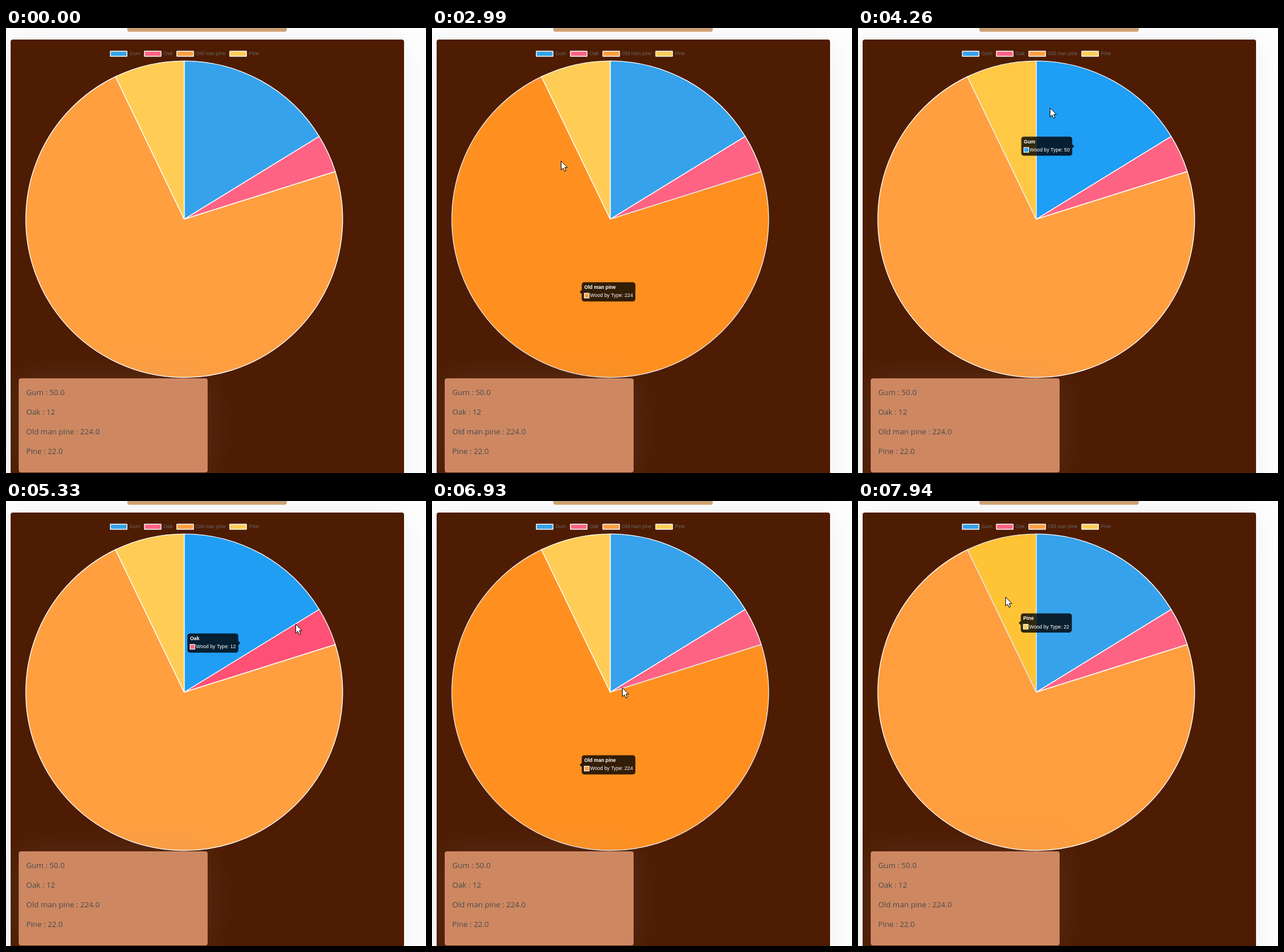
These frames come from a looping animation (727x771 px, 8000 ms). An HTML page with a canvas:

```html
<!DOCTYPE html>
<html lang="en">
<head>
<meta charset="utf-8">
<title>Wood by type</title>
<style>
  html, body { margin: 0; width: 100%; height: 100%; overflow: hidden; background: #fff; }
  canvas { display: block; }
</style>
</head>
<body>
<canvas id="stage" width="727" height="771"></canvas>
<script>
const ctx = document.getElementById('stage').getContext('2d');
const LOOP = 8000, STEP = 1000 / 15, FADE = 400;
const UNIT = 0.72;                       // chart pixels to stage pixels
const CX = 308.5, CY = 331.3, RADIUS = 274.2;
const SMALL = `${12 * UNIT}px "Liberation Sans", sans-serif`;

const slices = [
  { name: 'Gum', value: 50, shown: '50.0', color: [54, 162, 235], hover: [6, 154, 255], side: 'right' },
  { name: 'Oak', value: 12, shown: '12', color: [255, 99, 132], hover: [255, 64, 105], side: 'right' },
  { name: 'Old man pine', value: 224, shown: '224.0', color: [255, 159, 64], hover: [255, 144, 32], side: 'left' },
  { name: 'Pine', value: 22, shown: '22.0', color: [255, 205, 86], hover: [255, 194, 52], side: 'left' },
];

// [time, slice under the pointer]
const hovers = [[1385, 2], [3230, 3], [4202, 0], [5261, 1], [6504, 2], [7115, 3], [7206, 2], [7725, 3]];

// [time, x, y] of the pointer tip; it is hidden between the paths
const paths = [
  [[730, 722, 676], [800, 718, 714]],
  [[1333, 603, 418], [1400, 560, 426], [1600, 420, 450], [1850, 290, 436], [2067, 242, 421],
   [2333, 242, 421], [2667, 234, 350], [3000, 223, 230], [3200, 226, 178], [3267, 240, 162],
   [3600, 262, 140], [3867, 270, 135], [4067, 270, 135], [4133, 285, 134], [4267, 332, 138],
   [4600, 420, 150], [4933, 470, 170], [5267, 499, 207], [5333, 501, 213], [5667, 508, 232],
   [6200, 508, 232], [6533, 499, 284], [6800, 400, 375], [7067, 258, 270], [7133, 248, 200],
   [7200, 233, 215], [7400, 221, 231], [7600, 221, 231], [7667, 228, 215], [7733, 240, 185],
   [7800, 248, 172], [7933, 255, 166], [8000, 257, 164]],
];

const lerp = (a, b, k) => a + (b - a) * k;
const mix = (a, b, k) => a.map((v, i) => lerp(v, b[i], k));
const rgb = c => `rgb(${c.map(Math.round)})`;
const easeOutQuart = p => 1 - (1 - Math.min(1, p)) ** 4;

function text(string, x, y, font, color, baseline = 'middle') {
  ctx.font = font;
  ctx.fillStyle = color;
  ctx.textBaseline = baseline;
  ctx.fillText(string, x, y);
}

function panel(x, y, w, h, r, color) {
  ctx.fillStyle = color;
  ctx.beginPath();
  ctx.roundRect(x, y, w, h, r);
  ctx.fill();
}

function shadowPanel(...box) {
  ctx.save();
  ctx.shadowColor = 'rgba(140, 152, 170, 0.16)';
  ctx.shadowBlur = 60;
  panel(...box);
  ctx.restore();
}

// Angles and tooltip placement follow from the values.
const total = slices.reduce((sum, s) => sum + s.value, 0);
let angle = -Math.PI / 2;
ctx.font = SMALL;
for (const s of slices) {
  s.start = angle;
  s.end = angle += s.value / total * 2 * Math.PI;
  const middle = (s.start + s.end) / 2;
  s.label = `Wood by Type: ${s.value}`;
  s.tipWidth = ctx.measureText(s.label).width + 26 * UNIT;
  const anchor = CX + Math.cos(middle) * RADIUS / 2;
  s.tipX = s.side === 'left' ? anchor + 7 * UNIT : anchor - 7 * UNIT - s.tipWidth;
  s.tipY = CY + Math.sin(middle) * RADIUS / 2;
}

// State vector: highlight of each slice, then tooltip x, y, width and opacity.
function hoverState(t) {
  const targetOf = i => {
    const s = slices[i];
    return [...slices.map((_, k) => +(k === i)), s.tipX, s.tipY, s.tipWidth, 1];
  };
  const first = slices[hovers[0][1]];
  let state = [0, 0, 0, 0, first.tipX, first.tipY, first.tipWidth, 0];
  let active = null;
  hovers.forEach(([time, index], n) => {
    if (t < time) return;
    const until = Math.min(t, hovers[n + 1]?.[0] ?? LOOP);
    state = mix(state, targetOf(index), easeOutQuart((until - time) / FADE));
    active = slices[index];
  });
  return { state, active };
}

function drawLegend() {
  let x = 180.6;
  for (const s of slices) {
    ctx.fillStyle = rgb(s.color);
    ctx.strokeStyle = '#fff';
    ctx.lineWidth = 2 * UNIT;
    ctx.fillRect(x, 40.3, 40 * UNIT, 12 * UNIT);
    ctx.strokeRect(x, 40.3, 40 * UNIT, 12 * UNIT);
    text(s.name, x + 46 * UNIT, 44.4, SMALL, '#666');
    x += 56 * UNIT + ctx.measureText(s.name).width;
  }
}

function drawPie(highlights) {
  ctx.lineWidth = 2 * UNIT;
  ctx.lineJoin = 'bevel';
  slices.forEach((s, i) => {
    ctx.beginPath();
    ctx.arc(CX, CY, RADIUS, s.start, s.end);
    ctx.lineTo(CX, CY);
    ctx.closePath();
    ctx.fillStyle = rgb(mix(s.color, s.hover, highlights[i]));
    ctx.strokeStyle = rgb(mix([255, 255, 255], [230, 230, 230], highlights[i]));
    ctx.fill();
    ctx.stroke();
  });
}

function drawTooltip(slice, [x, y, width, opacity]) {
  const height = 46 * UNIT, top = y - height / 2, pad = 6 * UNIT, box = 12 * UNIT;
  ctx.save();
  ctx.globalAlpha = opacity;
  ctx.fillStyle = 'rgba(0, 0, 0, 0.8)';
  const left = slice.side === 'left';
  const edge = left ? x : x + width, tip = edge + (left ? -5 : 5) * UNIT;
  ctx.beginPath();
  ctx.roundRect(x, top, width, height, 6 * UNIT);
  ctx.moveTo(edge, y - 5 * UNIT);
  if (left) {
    ctx.lineTo(edge, y + 5 * UNIT);
    ctx.lineTo(tip, y);
  } else {
    ctx.lineTo(tip, y);
    ctx.lineTo(edge, y + 5 * UNIT);
  }
  ctx.fill('nonzero');

  const row = top + 32 * UNIT;
  text(slice.name, x + pad, top + 12.5 * UNIT, `bold ${SMALL}`, '#fff');
  ctx.fillStyle = '#fff';
  ctx.fillRect(x + pad - 0.4, row - box / 2 - 0.4, box + 0.8, box + 0.8);
  ctx.fillStyle = rgb(slice.color);
  ctx.fillRect(x + pad + 0.8, row - box / 2 + 0.8, box - 1.6, box - 1.6);
  text(slice.label, x + pad + 14 * UNIT, row + 0.4, SMALL, '#fff');
  ctx.restore();
}

function drawList() {
  shadowPanel(22, 607, 327, 163, 4, '#cd8862');
  slices.forEach((s, i) =>
    text(`${s.name} : ${s.shown}`, 35, 635.5 + i * 34.2, '13.2px "Open Sans", sans-serif', '#4a4a4a', 'alphabetic'));
}

function pointerAt(t) {
  const path = paths.find(p => t >= p[0][0] && t <= p.at(-1)[0] + 30);
  if (!path) return null;
  const next = path.findIndex(p => p[0] > t);
  if (next < 1) return path.at(-1).slice(1);
  const [a, b] = [path[next - 1], path[next]];
  return mix(a, b, (t - a[0]) / (b[0] - a[0])).slice(1);
}

const arrow = new Path2D('M.5 .5V16L4 12.7 6.4 18.2 9 17.1 6.7 11.7H11.3Z');
function drawPointer(x, y) {
  ctx.save();
  ctx.translate(Math.round(x), Math.round(y));
  ctx.fillStyle = '#fff';
  ctx.strokeStyle = '#000';
  ctx.lineWidth = 1;
  ctx.lineJoin = 'miter';
  ctx.fill(arrow);
  ctx.stroke(arrow);
  ctx.restore();
}

function draw(t) {
  ctx.fillStyle = '#fff';
  ctx.fillRect(0, 0, 727, 771);
  shadowPanel(8, 20, 681, 800, 4, '#4e1c02');
  panel(210, -20, 276, 26.5, 4, '#cda073');
  drawLegend();
  const { state, active } = hoverState(t);
  drawPie(state);
  if (active) drawTooltip(active, state.slice(4));
  drawList();
  const pointer = pointerAt(t);
  if (pointer) drawPointer(...pointer);
}

const origin = performance.now();
function tick() {
  const t = (performance.now() - origin) % LOOP;
  draw(Math.min(119, Math.floor((t + 14) / STEP)) * STEP);
  requestAnimationFrame(tick);
}
tick();
</script>
</body>
</html>
```
